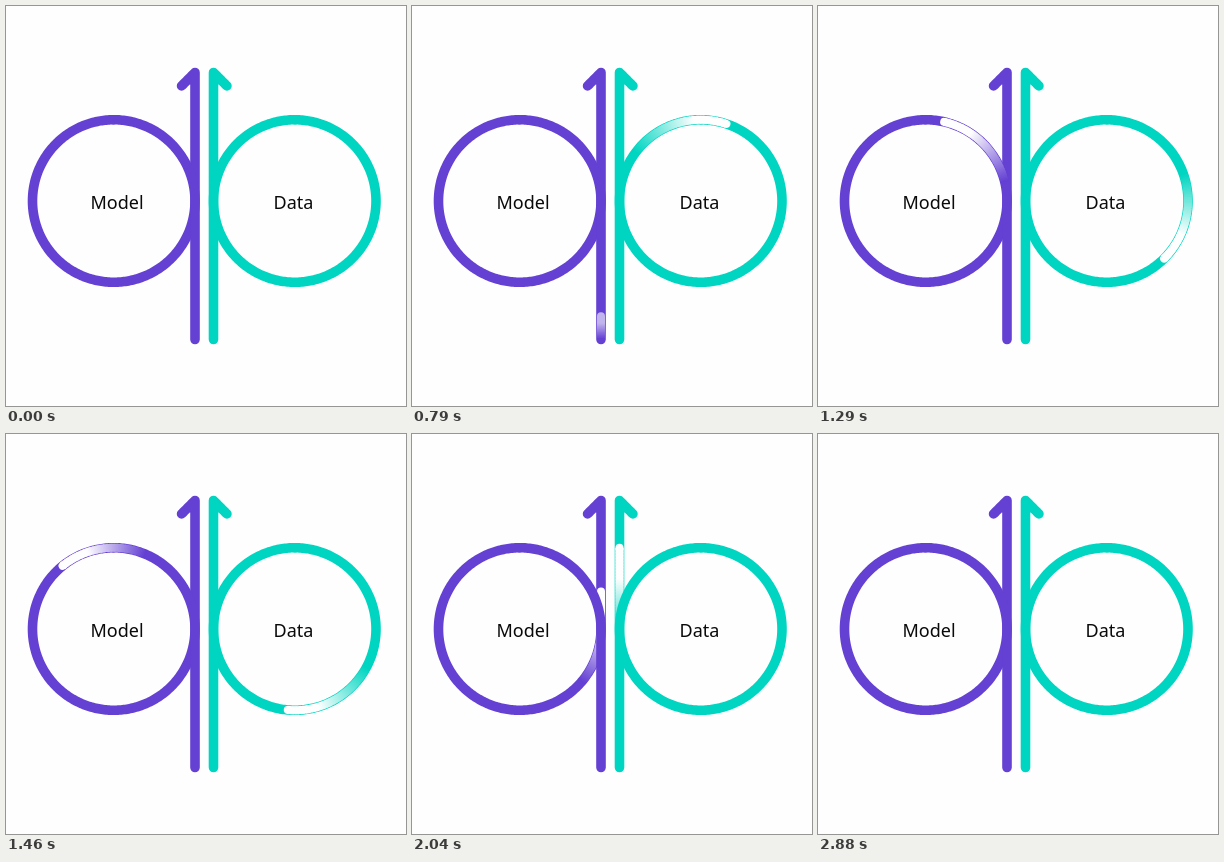
Animation, 400 px wide and 400 px high, one loop 3.96 s. Source, as an HTML page with a canvas:

```html
<!DOCTYPE html>
<html lang="en">
<head>
<meta charset="utf-8">
<title>Model and data</title>
<style>
  html, body { margin: 0; width: 100%; height: 100%; overflow: hidden; background: #fefefe; }
  canvas, svg { position: absolute; left: 0; top: 0; width: 400px; height: 400px; }
  text { font: 500 18px "Noto Sans", "Open Sans", sans-serif; fill: #0a0a0a; text-anchor: middle; }
</style>
</head>
<body>
<canvas id="stage"></canvas>
<svg viewBox="0 0 400 400">
  <text x="111" y="202.5">Model</text>
  <text x="287.5" y="202.5">Data</text>
</svg>
<script>
const LOOP = 3960;
const X = 207.5, BOTTOM = 333.5, TOP = 66.5, MID = 195, R = 81.25;
const RISE = BOTTOM - MID, RING = 2 * Math.PI * R;
const TIP = RISE + RING + MID - TOP, END = TIP + 19;
const HALF = RISE + RING / 2, COVER = RISE + RING / 4;
const BASE_W = 9.6, GLOW_W = 8;

// Keys: time, distance of the head along the path, length of the trail
const strands = [
  { rgb: [100, 64, 211], mirror: true, keys: [
    [700, 0, 0], [790, 23, 23], [1080, 157, 92], [1460, 321, 88], [1630, 402, 92],
    [2040, 686, 95], [2170, 741, 98], [2440, 785, 45], [2640, 796, 0]] },
  { rgb: [0, 213, 193], mirror: false, keys: [
    [0, 0, 0], [330, 127, 58], [540, 211, 82], [790, 292, 102], [1080, 376, 90],
    [1460, 528, 95], [1630, 596, 98], [2040, 730, 95], [2170, 742, 95],
    [2440, 775, 45], [2640, 786, 0]] }
];

const canvas = document.getElementById("stage");
const ctx = canvas.getContext("2d");
const ratio = window.devicePixelRatio || 1;
canvas.width = canvas.height = 400 * ratio;
ctx.scale(ratio, ratio);
ctx.lineJoin = "round";

// Line up, once around the ring, line up again, then the arrow barb
function pointAt(s) {
  if (s < RISE) return [X, BOTTOM - s];
  s -= RISE;
  if (s < RING) {
    const a = s / R;
    return [X + R - R * Math.cos(a), MID - R * Math.sin(a)];
  }
  s -= RING;
  if (s < MID - TOP) return [X, MID - s];
  const d = (s - MID + TOP) * Math.SQRT1_2;
  return [X + d, TOP + d];
}

function stroke(from, to, width, color, cap) {
  ctx.beginPath();
  for (let s = from; s < to; s += 1.5) {
    ctx.lineTo(...pointAt(s));
    if (s < TIP && s + 1.5 > TIP) ctx.lineTo(X, TOP);
  }
  ctx.lineTo(...pointAt(to));
  ctx.lineWidth = width;
  ctx.lineCap = cap;
  ctx.strokeStyle = color;
  ctx.stroke();
}

// Monotone cubic interpolation of one key column
function sample(keys, col, t) {
  const slope = i => (keys[i + 1][col] - keys[i][col]) / (keys[i + 1][0] - keys[i][0]);
  const tangent = i => {
    if (i === 0) return slope(0);
    if (i === keys.length - 1) return slope(i - 1);
    const a = slope(i - 1), b = slope(i);
    return a * b > 0 ? 2 * a * b / (a + b) : 0;
  };
  let i = 0;
  while (i < keys.length - 2 && t > keys[i + 1][0]) i++;
  const span = keys[i + 1][0] - keys[i][0];
  const u = (t - keys[i][0]) / span, v = 1 - u;
  return keys[i][col] * (1 + 2 * u) * v * v + tangent(i) * span * u * v * v
    + keys[i + 1][col] * u * u * (3 - 2 * u) - tangent(i + 1) * span * u * u * v;
}

function tint(rgb, k) {
  return `rgb(${rgb.map(c => Math.round(c + (254 - c) * k)).join()})`;
}

function glow(rgb, head, len, from, to) {
  if (len < 1) return;
  const tail = Math.max(0, head - len);
  const power = Math.min(1, len / 38);
  const shade = s => tint(rgb, power * Math.min(1, 1.5 * (s - tail) / (head - tail)));
  const stop = Math.min(head, to);
  for (let s = Math.max(tail, from); s < stop; s += 1.5) {
    stroke(s, Math.min(s + 2.5, head), GLOW_W, shade(s), "butt");
  }
  if (head > from && head <= to) {
    stroke(Math.max(tail, head - 0.5), head, GLOW_W, shade(head), "round");
  }
}

function drawStrand({ rgb, mirror, keys }, t) {
  const live = t > keys[0][0] && t < keys[keys.length - 1][0];
  const head = live ? sample(keys, 1, t) : 0;
  const len = live ? sample(keys, 2, t) : 0;
  const color = tint(rgb, 0);
  ctx.save();
  if (mirror) {
    ctx.translate(396.5, 0);
    ctx.scale(-1, 1);
  }
  // The first half of the strand lies over the second
  stroke(COVER, END, BASE_W, color, "round");
  glow(rgb, head, len, HALF, END);
  stroke(0, COVER, BASE_W, color, "round");
  glow(rgb, head, len, 0, HALF);
  ctx.restore();
}

function frame() {
  const t = performance.now() % LOOP;
  ctx.clearRect(0, 0, 400, 400);
  strands.forEach(s => drawStrand(s, t));
  requestAnimationFrame(frame);
}
frame();
</script>
</body>
</html>
```
